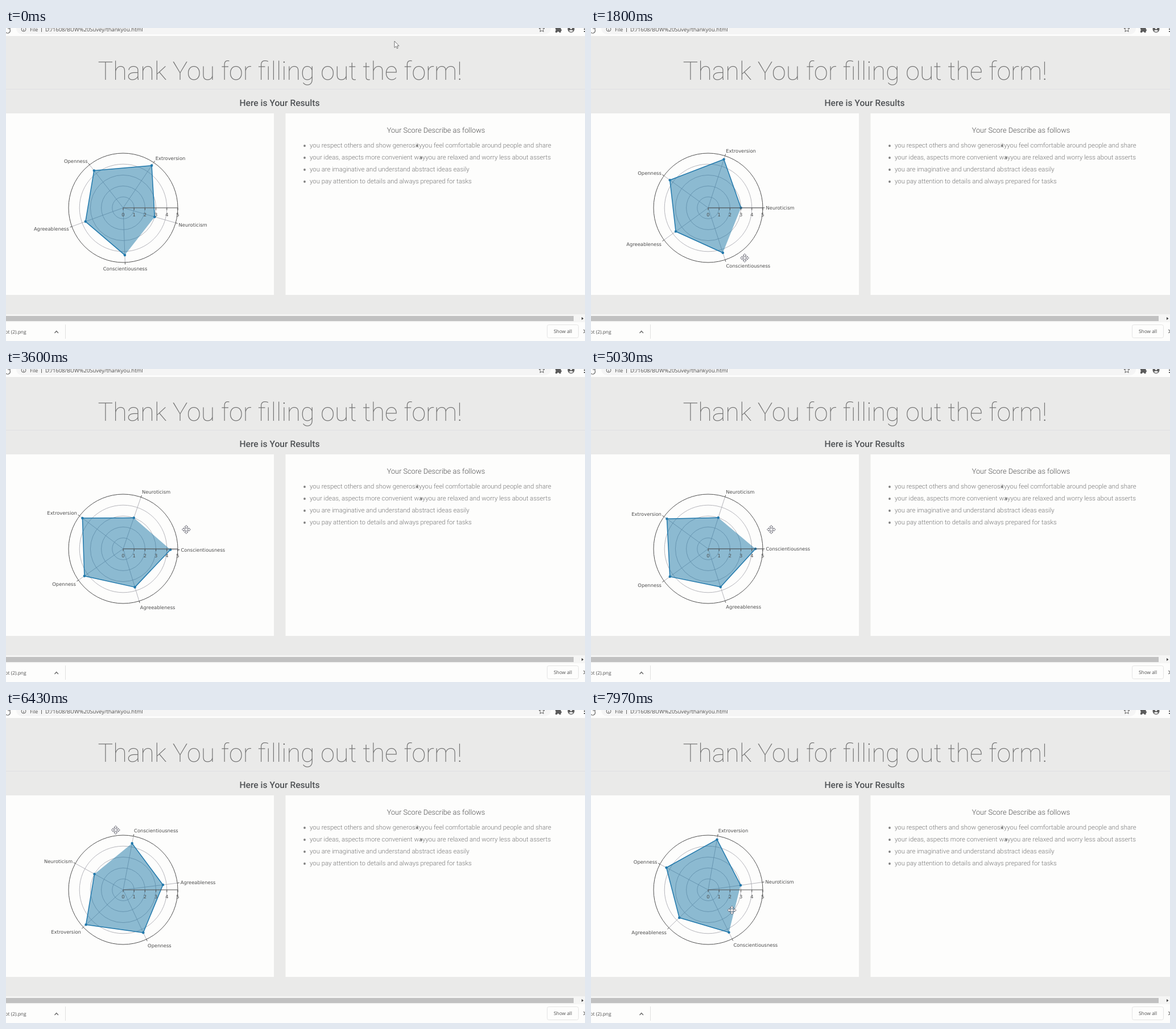
Write an HTML page that moves like this. It is 1018x550 px and loops after 8000 ms.

```html
<!DOCTYPE html>
<html lang="en">
<head>
<meta charset="utf-8">
<title>Survey results</title>
<style>
  html, body { margin: 0; width: 100%; height: 100%; overflow: hidden; background: #eaeae9; }
  svg { display: block; width: 100%; height: 100%; text-rendering: geometricPrecision; }
  .page { font-family: Roboto, sans-serif; font-weight: 300; }
  .chrome { font-family: "Open Sans", sans-serif; font-size: 8.4px; fill: #505050; }
  .chart { font-family: "DejaVu Sans", sans-serif; font-size: 8.4px; fill: #4c4c4c; }
  .middle { text-anchor: middle; }
  .line { fill: none; stroke: #666; }
</style>
</head>
<body>
<svg viewBox="0 0 1018 550">
  <rect width="1018" height="550" fill="#eaeae9"/>

  <!-- Address bar -->
  <g class="chrome">
    <rect width="1018" height="14" fill="#fdfdfc"/>
    <rect x="18" y="-10" width="940" height="21" rx="10" fill="#f5f5f5"/>
    <path class="line" d="M-1 6.5A4 4 0 0 0 7 3V0M7 1H3" stroke-width="1.2"/>
    <circle class="line" cx="31" cy="2" r="4"/>
    <path class="line" d="M31 1.5V5M62.5-2V7"/>
    <text x="42" y="5.5" font-size="9" style="font-size:9px">File</text>
    <text x="69" y="5.5" style="font-size:9.46px">D:/1608/BUW%20Suvey/thankyou.html</text>
    <path class="line" d="M942-3l1.4 3.300 3.600.3-2.700 2.300.8 3.600-3.100-1.900-3.100 1.900.8-3.600-2.700-2.300 3.600-.3z"/>
    <path d="M966-1h3a1.800 1.800 0 0 1 3.600 0h3v3a1.800 1.800 0 0 1 0 3.500V8h-3a1.800 1.800 0 0 0-3.600 0h-3V5a1.800 1.800 0 0 0 0-3z" fill="#5c5c5c"/>
    <circle cx="993.5" cy="2" r="6" fill="#5c5c5c"/>
    <circle cx="993.5" cy="0" r="2" fill="#fdfdfc"/>
    <path d="M989.5 5q4-3 8 0q-4 3.500-8 0z" fill="#fdfdfc"/>
    <path d="M1016 1h2v2h-2zM1016 5h2v2h-2z" fill="#5c5c5c"/>
  </g>

  <!-- Page -->
  <g class="page">
    <text class="middle" x="481.7" y="91" font-size="44.8" font-weight="100" fill="#707070">Thank You for filling out the form!</text>
    <path d="M0 107.500H1018" stroke="#e0e0e2"/>
    <text class="middle" x="481" y="137" font-size="15.6" font-weight="500" fill="#505356">Here is Your Results</text>
    <path d="M0 150H471V469H0zM491.500 150H1018V469H491.500z" fill="#fdfdfc"/>
    <text class="middle" x="756" y="184" font-size="12.75" fill="#505050">Your Score Describe as follows</text>
    <g font-size="11.34" fill="#757575">
      <text x="534" y="210">you respect others and show generosityyou feel comfortable around people and share</text>
      <text x="534" y="231">your ideas, aspects more convenient wayyou are relaxed and worry less about asserts</text>
      <text x="534" y="252">you are imaginative and understand abstract ideas easily</text>
      <text x="534" y="273">you pay attention to details and always prepared for tasks</text>
    </g>
    <path d="M525 207h0M525 228h0M525 249h0M525 270h0M723 207h0M730 228h0"
      stroke="#808080" stroke-width="3.8" stroke-linecap="round"/>
  </g>

  <!-- Scroll bar and download shelf -->
  <g class="chrome">
    <rect y="503" width="1018" height="14" fill="#f5f5f4"/>
    <rect y="506" width="998" height="9" fill="#c1c1c1"/>
    <path d="M1012 508l3.500 2.500-3.500 2.500z" fill="#444"/>
    <rect y="517" width="1018" height="33" fill="#fdfdfc"/>
    <text x="-1.5" y="537">ot (2).png</text>
    <path class="line" d="M85.500 536l3.200-3.500 3.200 3.500" stroke-width="1.3"/>
    <path d="M104.500 521V546" stroke="#e0e0e0"/>
    <rect x="951.5" y="521.5" width="55" height="23" rx="3" fill="#fdfdfc" stroke="#e4e4e4"/>
    <text class="middle" x="979" y="536" font-weight="500">Show all</text>
    <path class="line" d="M1015.500 530l6 6M1015.500 536l6-6" stroke-width="1.2"/>
  </g>

  <g class="chart">
    <g id="grid" fill="none" stroke="#a3a3aa" stroke-width=".8"></g>
    <path id="spokes" fill="none" stroke="#a3a3aa" stroke-width=".8"/>
    <path id="area" fill="#1c78a8" fill-opacity=".5"/>
    <path id="outline" fill="none" stroke="#2279ac" stroke-width="1.5" stroke-linejoin="round"/>
    <path id="markers" stroke="#2279ac" stroke-width="4.6" stroke-linecap="round"/>
    <circle cx="206" cy="316" r="96" fill="none" stroke="#505050"/>
    <path id="ticks" fill="none" stroke="#505050"/>
    <g id="labels"></g>
  </g>

  <path id="arrow" d="M0 0V11.500L2.700 9.100 4.400 13 6.200 12.200 4.500 8.400H8z" fill="#fff" stroke="#555" stroke-width=".8"/>
  <path id="move" d="M0-7.500L3-4.300H1.200V-1.200H4.300V-3L7.500 0 4.300 3V1.200H1.200V4.300H3L0 7.500-3 4.300H-1.200V1.200H-4.300V3L-7.500 0-4.300-3V-1.200H-1.200V-4.300H-3z" fill="#fff" stroke="#5c5c68" stroke-width=".9"/>
</svg>

<script>
const LOOP = 8000, CX = 206, CY = 316, UNIT = 19.2, RADIUS = 96, FONT = 8.4, STANDOFF = 5.5;
const START = [683, 23];
const traits = [
  ["Neuroticism", 3], ["Extroversion", 4.67], ["Openness", 4.33],
  ["Agreeableness", 3.67], ["Conscientiousness", 4.33]
];
// Time, chart rotation, pointer angle, pointer radius
const dragKeys = [
  [1600, -16, -70, 108], [1800, 0, -54, 109], [2430, 45, -10, 115],
  [3100, 71, 17, 116], [4200, 71, 17, 116], [4300, 72, 17, 116],
  [5100, 72, 17, 116], [5850, 108, 54, 117], [6430, 151, 97, 106],
  [7150, 252, 200, 90], [7970, 368, 319.4, 55]
];

const $ = id => document.getElementById(id);
const set = (el, attrs) => { for (const k in attrs) el.setAttribute(k, attrs[k]); };
const add = (parent, tag, attrs, text = "") => {
  const el = document.createElementNS("http://www.w3.org/2000/svg", tag);
  set(el, attrs);
  el.textContent = text;
  return parent.appendChild(el);
};
const polar = (deg, r) => {
  const a = deg * Math.PI / 180;
  return [CX + r * Math.cos(a), CY - r * Math.sin(a)];
};
const mix = (a, b, p) => a + (b - a) * p;
const smooth = p => p * p * (3 - 2 * p);
const clamp = p => Math.max(0, Math.min(1, p));

function dragAt(t) {
  let i = 0;
  while (i < dragKeys.length - 2 && t >= dragKeys[i + 1][0]) i++;
  const a = dragKeys[i], b = dragKeys[i + 1];
  const p = clamp((t - a[0]) / (b[0] - a[0]));
  return a.slice(1).map((v, k) => mix(v, b[k + 1], p));
}

let axis = `M${CX} ${CY}h${RADIUS}`;
for (let n = 0; n <= 5; n++) {
  const x = CX + n * UNIT;
  if (n && n < 5) add($("grid"), "circle", { cx: CX, cy: CY, r: n * UNIT });
  add($("labels"), "text", { x, y: 330.5, class: "middle" }, n);
  axis += `M${x} ${CY}v4`;
}
const labels = traits.map(([name]) => add($("labels"), "text", {}, name));

function placeLabel(el, deg) {
  const a = deg * Math.PI / 180, cos = Math.cos(a), sin = Math.sin(a);
  const [x, y] = polar(deg, RADIUS);
  const lift = STANDOFF + FONT * (sin > 0 ? 0.2 : 1);
  set(el, {
    x: x + cos * STANDOFF,
    y: y - sin * lift + Math.abs(cos) * FONT * 0.35,
    "text-anchor": Math.abs(cos) < 0.1 ? "middle" : cos > 0 ? "start" : "end"
  });
}

function draw(t) {
  const [rotation, angle, radius] = dragAt(t);
  const angles = traits.map((_, i) => rotation + 72 * i);
  const points = traits.map(([, score], i) => polar(angles[i], score * UNIT));
  const path = "M" + points.join("L");

  set($("spokes"), { d: angles.map(a => `M${CX} ${CY}L${polar(a, RADIUS)}`).join("") });
  set($("ticks"), { d: axis + angles.map(a => `M${polar(a, RADIUS)}L${polar(a, RADIUS + 3.5)}`).join("") });
  set($("area"), { d: path + "Z" });
  set($("outline"), { d: path });
  set($("markers"), { d: points.map(p => `M${p}h0`).join("") });
  labels.forEach((el, i) => placeLabel(el, angles[i]));

  const approach = smooth(clamp((t - 150) / 1250));
  const onRing = approach > 0.97;
  const pointer = polar(angle, radius).map((v, k) => mix(START[k], v, approach));
  const transform = `translate(${pointer})`;
  set($("arrow"), { transform, visibility: onRing ? "hidden" : "visible" });
  set($("move"), { transform, visibility: onRing ? "visible" : "hidden" });
}

function frame() {
  draw(performance.now() % LOOP);
  requestAnimationFrame(frame);
}
frame();
</script>
</body>
</html>
```
